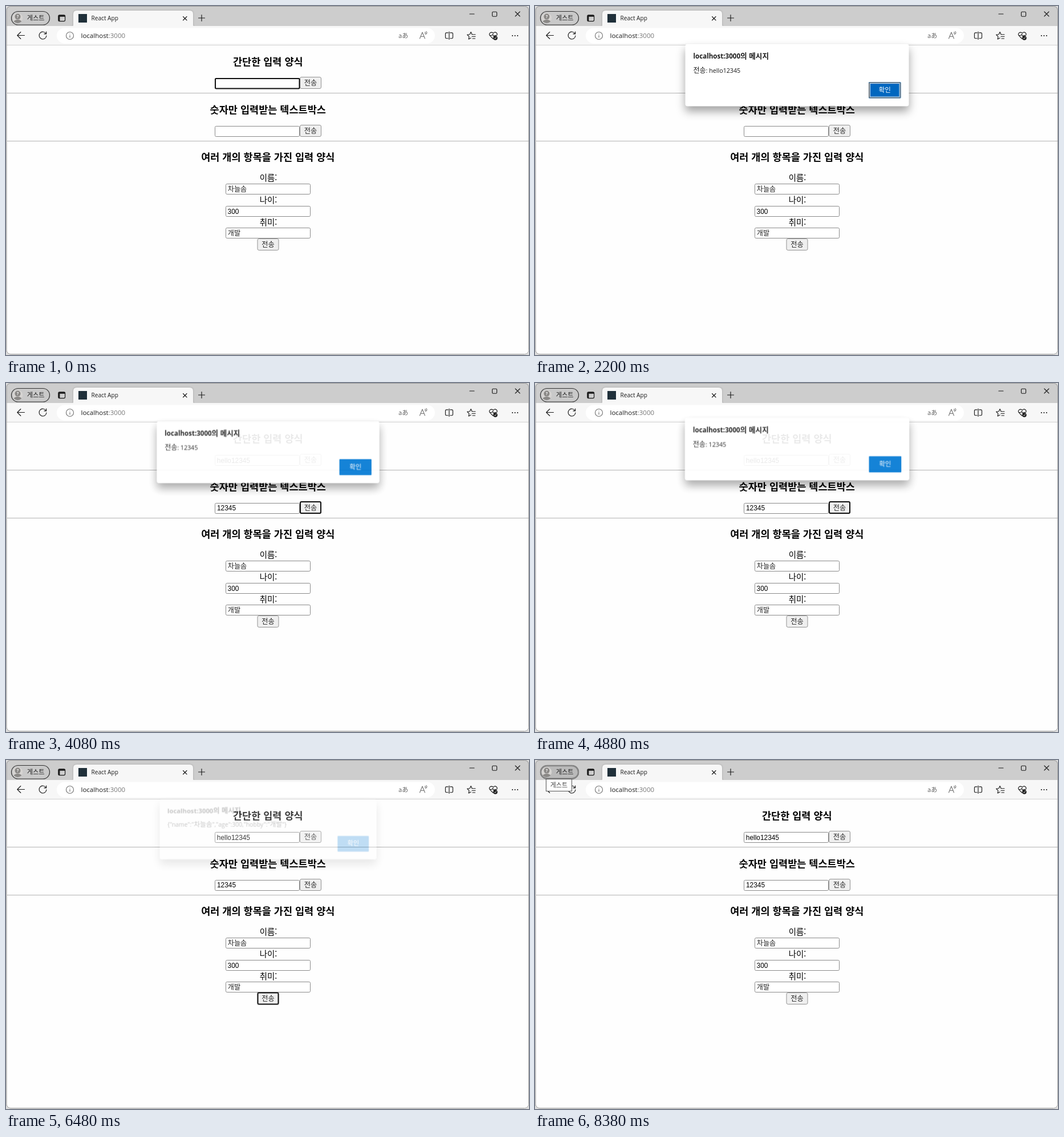
An HTML page for the animation above (8640 ms loop, 917 by 611 pixels).

```html
<!DOCTYPE html>
<html lang="ko">
<head>
<meta charset="utf-8">
<title>React App</title>
<style>
html, body { margin: 0; width: 100%; height: 100%; overflow: hidden; background: #dcdcdc; }
svg { display: block; }
text { font-family: "Noto Sans CJK KR", "Noto Sans CJK", "Noto Sans KR", sans-serif; white-space: pre; fill: #000; }
.mid { text-anchor: middle; }
.head text { font-size: 17.55px; font-weight: 700; }
.label text { font-size: 14.4px; }
.field { font-size: 12.1px; fill: #222; }
.num { font-family: "Liberation Sans", Arial, sans-serif; font-size: 11.9px; }
.btn { font-size: 12.2px; fill: #222; }
.ui { font-family: "Open Sans", "Noto Sans", "Noto Sans CJK KR", sans-serif; font-size: 10.7px; fill: #1b1b1b; }
.ko { font-family: "Noto Sans CJK KR", "Noto Sans CJK", sans-serif; font-size: 12px; }
.line { fill: none; stroke: #1b1b1b; stroke-width: 1.15; stroke-linecap: round; stroke-linejoin: round; }
.soft { stroke: #767676; }
.ring { fill: none; stroke: #101010; stroke-width: 2; }
.sel { fill: #3367d1; }
.inv { fill: #fff; }
#tab { filter: drop-shadow(0 0 1.5px rgba(0, 0, 0, .22)); }
#sheet { filter: drop-shadow(0 9px 8px rgba(0, 0, 0, .36)); }

/* Every state shares one clock; unset ends fall back to hidden. */
.k { opacity: 0; animation: 8640ms step-end infinite; }
@keyframes in1   { 0% { opacity: 1 } 12.5% { opacity: 0 } }
@keyframes caret { 3.009% { opacity: 1 } 7.06% { opacity: 0 } }
@keyframes hello { 7.06% { opacity: 1 } }
@keyframes btn1  { 12.5% { opacity: 1 } 31.713% { opacity: 0 } }
@keyframes in2   { 31.713% { opacity: 1 } 39.352% { opacity: 0 } }
@keyframes digits { 36.343% { opacity: 1 } }
@keyframes btn2  { 39.352% { opacity: 1 } 60.417% { opacity: 0 } }
@keyframes name  { 60.417% { opacity: 1 } 64.931% { opacity: 0 } }
@keyframes age   { 64.931% { opacity: 1 } 67.245% { opacity: 0 } }
@keyframes hobby { 67.245% { opacity: 1 } 68.866% { opacity: 0 } }
@keyframes btn3  { 68.866% { opacity: 1 } 90.741% { opacity: 0 } }
@keyframes guest { 90.741% { opacity: 1 } }
@keyframes tip   { 96.991% { opacity: 1 } }
@keyframes msg1  { 0% { opacity: 1 } 35% { opacity: 0 } }
@keyframes msg2  { 35% { opacity: 1 } 62% { opacity: 0 } }
@keyframes msg3  { 62% { opacity: 1 } }
@keyframes press { 25.463% { opacity: 1 } 27.083% { opacity: 0 } }
@keyframes okring {
  19.329%, 48.032%, 76.62% { opacity: 1 }
  27.083%, 56.481%, 86.111% { opacity: 0 }
}
#dialog { transform-origin: 459px 121px; animation-name: dialog; }
@keyframes dialog {
  15.625% { opacity: .15; transform: scale(.96) }
  16.435% { opacity: .5; transform: scale(.98) }
  17.245% { opacity: .8; transform: scale(.992) }
  18.056% { opacity: .95; transform: scale(.998) }
  19.329%, 48.032%, 76.62% { opacity: 1; transform: none }
  27.083% { opacity: .96; transform: translateY(-4.5px) scale(1.004) }
  27.894% { opacity: .5; transform: translateY(-7px) scale(1.02) }
  28.588% { opacity: .15; transform: translateY(-8px) scale(1.04) }
  29.398%, 58.102%, 88.426% { opacity: 0; transform: none }
  45.718%, 74.306% { opacity: .25; transform: scale(.97) }
  46.528%, 75.116% { opacity: .65; transform: scale(.985) }
  47.222%, 75.81% { opacity: .92; transform: scale(.996) }
  56.481% { opacity: .92; transform: translateY(-5.3px) scale(1.004) }
  57.292% { opacity: .4; transform: translateY(-8px) scale(1.03) }
  86.111% { opacity: 1; transform: translateY(-3.4px) scale(1.003) }
  86.921% { opacity: .6; transform: translateY(-6.5px) scale(1.015) }
  87.616% { opacity: .2; transform: translateY(-8px) scale(1.04) }
}
</style>
</head>
<body>
<svg width="917" height="611" viewBox="0 0 917 611">
<defs>
  <rect id="box" x=".5" y=".5" width="148" height="18" rx="2" fill="#fff" stroke="#8a8a8a"/>
  <rect id="boxring" class="ring" x="1" y="1" width="147.5" height="17.5" rx="1.5"/>
  <g id="send">
    <rect x=".5" y=".5" width="37" height="20" rx="2.5" fill="#efefef" stroke="#929292"/>
    <text class="btn mid" x="19" y="15.2">전송</text>
  </g>
  <rect id="sendring" class="ring" x="1" y="0" width="36" height="20" rx="2"/>
  <clipPath id="face"><circle cx="20.5" cy="21" r="9"/></clipPath>
</defs>

<!-- window -->
<rect x="1" y="0" width="916" height="610" rx="7" fill="#cdcdcd"/>
<path id="tab" d="M115 36q3 0 3-3V14q0-6 6-6H322q6 0 6 6V33q0 3 3 3z" fill="#f7f7f7"/>
<path d="M1 35H917V69H1z" fill="#f7f7f7"/>
<path d="M1 69H917V603a7 7 0 0 1-7 7H8a7 7 0 0 1-7-7z" fill="#fefefe"/>
<path d="M1 68.5H917" stroke="#d2d2d2"/>
<rect x="1" y=".5" width="915.5" height="609" rx="7" fill="none" stroke="#969696"/>

<!-- tab strip -->
<rect x="9.5" y="9.5" width="67" height="23.5" rx="11.7" fill="#c9c9c9" stroke="#333" stroke-width="1.2"/>
<rect class="k" style="animation-name:guest" x="10" y="10" width="66" height="22.5" rx="11.2" fill="#bababa" stroke="#868686" stroke-width="2.4"/>
<g clip-path="url(#face)">
  <circle cx="20.5" cy="21" r="9" fill="#d6d4d2"/>
  <ellipse cx="20.5" cy="29" rx="7.5" ry="5" fill="#8a8886"/>
  <circle cx="20.5" cy="18.6" r="5" fill="#8a8886"/>
</g>
<text class="ui mid inv" x="20.5" y="21.4" style="font-size:7.5px;font-weight:700">?</text>
<text x="36.7" y="25" style="font-size:11.2px;fill:#222">게스트</text>
<rect class="line" x="91.8" y="15.8" width="11.8" height="10.8" rx="2"/>
<path d="M92 16h11.5v2.8H92zM92 16h2.4v10.5H92z" fill="#1b1b1b"/>
<rect x="127" y="14" width="15" height="15" fill="#20303a"/>
<text class="ui" x="149.6" y="25.3" style="font-size:10.1px">React App</text>
<path class="line" d="M310.5 18.5l6.500 6.5m0-6.5l-6.500 6.5M337.5 21h11M343 15.5v11"/>
<path class="line" d="M813 14h8M893 10l8 8m0-8l-8 8"/>
<rect class="line" x="852.6" y="10.2" width="8" height="8" rx="1.5"/>

<!-- toolbar -->
<path class="line" d="M32.5 51.5H19.8m6-6l-6 6l6 6"/>
<path class="line" d="M70 48.3A6.4 6.4 0 1 0 70.9 52M70.7 45v3.800h-3.8"/>
<rect x="89" y="38.5" width="663" height="27" rx="13.5" fill="#fff"/>
<circle class="line soft" cx="112" cy="52" r="6.5"/>
<path class="line soft" d="M112 51.5v3.500M112 48.9v.1"/>
<text class="ui" x="131.5" y="55.8" style="font-size:11.5px">localhost<tspan fill="#767676">:3000</tspan></text>
<text x="688" y="55.6" style="font-size:11px;fill:#666">aあ</text>
<path class="line soft" d="M725.5 57l4.500-11l4.500 11M727.3 53.5h5.400M734.5 48q1.500-1 .5-2.500M735.5 49.500q4-2 1.500-5"/>
<path class="line" d="M775.2 46.8h-3q-1.700 0-1.700 1.700v6.500q0 1.700 1.700 1.700h3M778.8 46.8h3q1.700 0 1.700 1.700v6.500q0 1.700-1.700 1.700h-3M777 45v13.5"/>
<path class="line" d="M817 49.5l-1.800-4l-2 4.200l-4.500 .7l3.300 3.200l-.8 4.500l4-2.100M817 50h6M817 53.500h6M818 57h4.500"/>
<path class="line" d="M854 57.5l-5.300-5.300a3.500 3.500 0 0 1 5-5l.6 .6l.6-.6a3.500 3.500 0 0 1 5.500 4.300M849 51.500h3l1.500-2l2 4l1.500-2h2.500"/>
<circle cx="858" cy="56" r="3.8" fill="#1b1b1b"/>
<path d="M856.3 56l1.300 1.300l2.300-2.600" fill="none" stroke="#fff"/>
<g fill="#1b1b1b"><circle cx="888" cy="52" r="1.1"/><circle cx="892.5" cy="52" r="1.1"/><circle cx="897" cy="52" r="1.1"/></g>

<!-- page -->
<path d="M2 152.5H916M2 236.5H916" stroke="#b2b2b2"/>
<g class="head mid">
  <text x="459.3" y="103.5">간단한 입력 양식</text>
  <text x="459.3" y="187.5">숫자만 입력받는 텍스트박스</text>
  <text x="459.3" y="271.3">여러 개의 항목을 가진 입력 양식</text>
</g>
<g class="label mid">
  <text x="460" y="306">이름:</text>
  <text x="460" y="345">나이:</text>
  <text x="460" y="384">취미:</text>
</g>
<use href="#box" x="366" y="126"/>
<use href="#box" x="366" y="210"/>
<use href="#box" x="385" y="311"/>
<use href="#box" x="385" y="350"/>
<use href="#box" x="385" y="388"/>
<use href="#send" x="515" y="124"/>
<use href="#send" x="515" y="208"/>
<use href="#send" x="440.5" y="407"/>

<text class="num k" style="animation-name:hello" x="369.8" y="139.6">hello12345</text>
<path class="k" style="animation-name:caret" d="M370.5 129v13" stroke="#000"/>
<text class="num k" style="animation-name:digits" x="370" y="223.4">12345</text>
<text class="field" x="388.8" y="325.1">차늘솜</text>
<text class="num" x="388.6" y="363.6">300</text>
<text class="field" x="388.8" y="402.4">개발</text>

<!-- focus -->
<use class="k" style="animation-name:in1" href="#boxring" x="366" y="126"/>
<use class="k" style="animation-name:btn1" href="#sendring" x="515" y="124"/>
<use class="k" style="animation-name:in2" href="#boxring" x="366" y="210"/>
<use class="k" style="animation-name:btn2" href="#sendring" x="515" y="208"/>
<g class="k" style="animation-name:name">
  <use href="#boxring" x="385" y="311"/>
  <path class="sel" d="M389 313h34v15.5h-34z"/>
  <text class="field inv" x="388.8" y="325.1">차늘솜</text>
</g>
<g class="k" style="animation-name:age">
  <use href="#boxring" x="385" y="350"/>
  <path class="sel" d="M389 352.5h19.5v14h-19.5z"/>
  <text class="num inv" x="388.6" y="363.6">300</text>
</g>
<g class="k" style="animation-name:hobby">
  <use href="#boxring" x="385" y="388"/>
  <path class="sel" d="M389 390h23v16h-23z"/>
  <text class="field inv" x="388.8" y="402.4">개발</text>
</g>
<use class="k" style="animation-name:btn3" href="#sendring" x="440.5" y="407.5"/>

<!-- alert -->
<g id="dialog" class="k">
  <rect id="sheet" x="263.5" y="66.5" width="392" height="109" rx="4" fill="#fff"/>
  <text class="ui" x="277.5" y="92.2" style="font-size:11.6px;font-weight:700">localhost:3000<tspan class="ko" style="font-size:12.6px">의 메시지</tspan></text>
  <text class="ui k" style="animation-name:msg1" x="277.5" y="117"><tspan class="ko">전송</tspan>: hello12345</text>
  <text class="ui k" style="animation-name:msg2" x="277.5" y="117"><tspan class="ko">전송</tspan>: 12345</text>
  <text class="ui k" style="animation-name:msg3" x="277.5" y="117">{"name":"<tspan class="ko">차늘솜</tspan>","age":300,"hobby":"<tspan class="ko">개발</tspan>"}</text>
  <rect x="585" y="133.3" width="56.5" height="28.2" rx="1" fill="#0078d4"/>
  <rect class="k" style="animation-name:press" x="587" y="135" width="52" height="24" fill="#0067bf"/>
  <g class="k" style="animation-name:okring" fill="none">
    <rect x="586" y="134.2" width="54.5" height="26.3" rx="1" stroke="#6a7885" stroke-width="2"/>
    <rect x="587.5" y="135.5" width="51.5" height="23.5" stroke="#fff" stroke-opacity=".8"/>
  </g>
  <text class="mid inv" x="613.3" y="150.6" style="font-size:11.5px">확인</text>
</g>

<!-- tooltip -->
<g class="k" style="animation-name:tip">
  <rect x="19.5" y="33.5" width="45" height="21" fill="#fff" stroke="#555"/>
  <text x="26.7" y="48.2" style="font-size:11px;fill:#444">게스트</text>
</g>
</svg>
</body>
</html>
```
